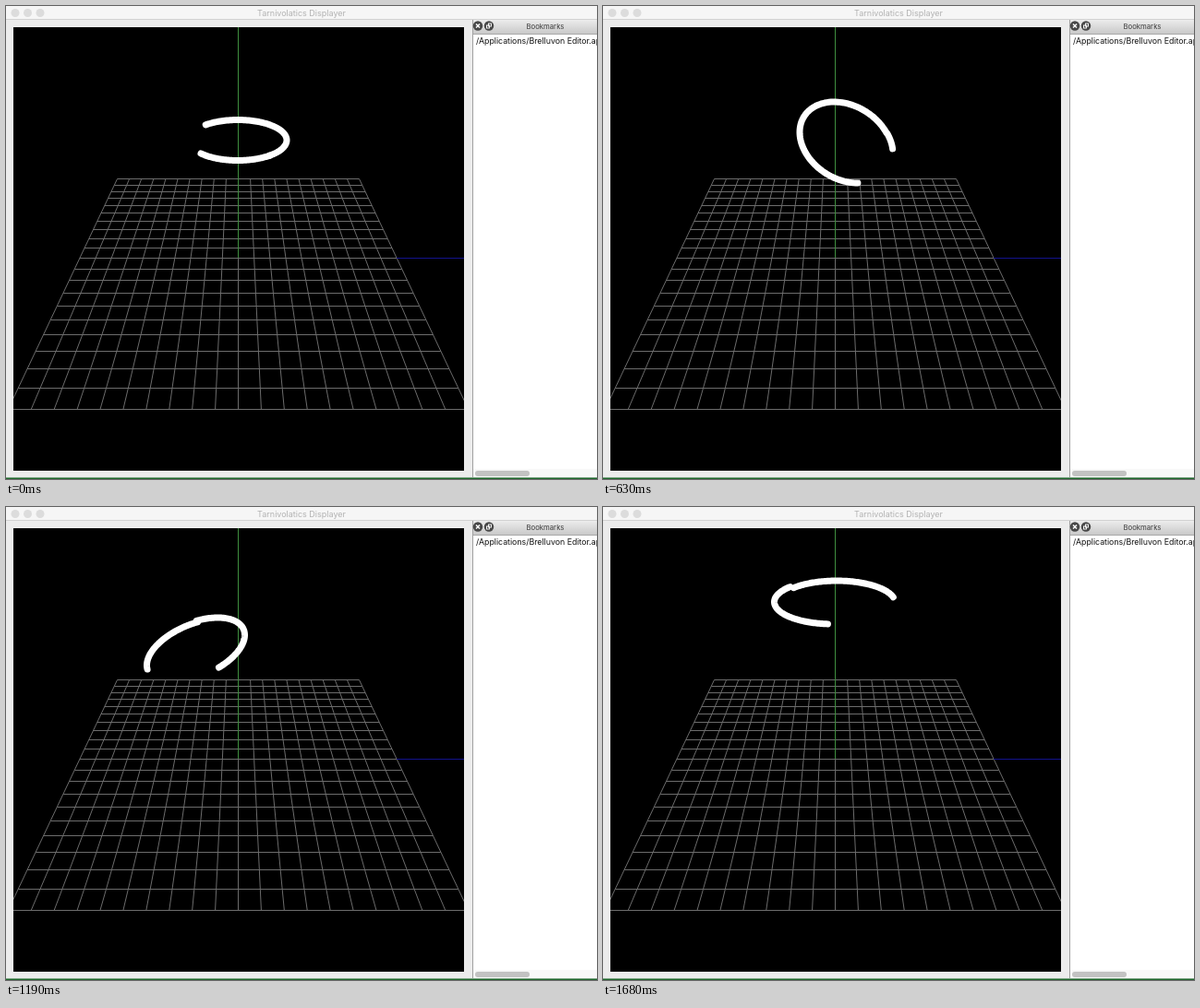
Recreate the animation shown at these times as an HTML page with a canvas. Size 640 by 513 pixels, loop 1750 ms.

```html
<!DOCTYPE html>
<html lang="en">
<head>
<meta charset="utf-8">
<style>
  html, body { margin: 0; width: 100%; height: 100%; overflow: hidden; background: #ececec; }
  canvas { display: block; width: 640px; height: 513px; }
</style>
</head>
<body>
<canvas id="stage" width="640" height="513"></canvas>
<script>
const ctx = document.getElementById("stage").getContext("2d");
const STEP = 70, STEPS = 25, RAD = Math.PI / 180;

// step, centre x/y, radius x/y, skew, head angle, span, seam, drift x/y of the older trail
const poses = [
  [0, 251, 145.5, 53, 22, 0, 229, 270, 180, 0, 0],
  [3, 251, 145.5, 53, 22, 0, 620, 260, 180, 0, 0],
  [5, 251, 145.5, 53, 22, 0, 921, 266, 200, 0, 0],
  [8, 264, 151.5, 49, 52, 15, 1372, 275, 250, 1, 1],
  [9, 263, 148, 50, 44, 14.7, 1515, 278, 256, 1, 1],
  [13, 228, 114, 53.5, 30, 4, 2093, 285, 185, 2, -2],
  [16, 197, 158, 55, 35, -29, 2547, 259, 121, 0, -2],
  [17, 206, 156, 53.5, 34.5, -27, 2691.5, 250, 100, -1, -1.5],
  [21, 289, 147, 57, 21, 6, 3338, 291, 79, -2, 1],
  [24, 249, 103, 63.5, 24, 0, 3695, 250, 128, 4, 1]
];

function poseAt(step) {
  const next = Math.max(1, poses.findIndex(p => p[0] >= step));
  const a = poses[next - 1], b = poses[next];
  const f = (step - a[0]) / (b[0] - a[0]);
  return a.map((v, i) => v + (b[i] - v) * f);
}

function rect(color, x, y, w, h) {
  ctx.fillStyle = color;
  ctx.fillRect(x, y, w, h);
}

function disc(color, x, y, r) {
  ctx.fillStyle = color;
  ctx.beginPath();
  ctx.arc(x, y, r, 0, 7);
  ctx.fill();
}

function line(color, width, ...pts) {
  ctx.strokeStyle = color;
  ctx.lineWidth = width;
  ctx.beginPath();
  for (let i = 0; i < pts.length; i += 2) ctx.lineTo(pts[i], pts[i + 1]);
  ctx.stroke();
}

function text(str, x, y, size, color, align) {
  ctx.font = `${size}px Inter, "Liberation Sans", sans-serif`;
  ctx.textAlign = align;
  ctx.fillStyle = color;
  ctx.fillText(str, x, y);
}

function shade(y0, y1, top, bottom) {
  const g = ctx.createLinearGradient(0, y0, 0, y1);
  g.addColorStop(0, top);
  g.addColorStop(1, bottom);
  return g;
}

function drawWindow() {
  rect("#ececec", 0, 0, 640, 513);
  rect("#f6f6f6", 0, 0, 640, 14);
  rect("#d2d2d2", 0, 14, 640, 1);
  for (const x of [10, 23.5, 37]) disc("#dcdcdc", x, 7.5, 4.5);
  text("Tarnivolatics Displayer", 320, 11, 9, "#b2b2b2", "center");
}

function drawBookmarks() {
  rect(shade(15, 30, "#ececec", "#c9c9c9"), 505, 15, 135, 15);
  rect("#fff", 505, 30, 135, 481);
  rect("#a9a9a9", 505, 30, 135, 1);
  rect("#a0a0a0", 505, 15, 1, 496);
  for (const x of [511, 523]) disc("#484848", x, 21.5, 5.2);
  line("#fff", 1.4, 509, 19.5, 513, 23.5);
  line("#fff", 1.4, 513, 19.5, 509, 23.5);
  ctx.strokeStyle = "#fff";
  ctx.lineWidth = 0.9;
  ctx.strokeRect(522.5, 19, 3, 3);
  ctx.strokeRect(520.5, 21, 3, 3);
  text("Bookmarks", 584, 25, 7.7, "#3c3c3c", "center");
  text("/Applications/Brelluvon Editor.app", 509, 40.5, 8.8, "#111", "left");
  rect("#f8f8f8", 506, 502, 134, 9);
  ctx.fillStyle = "#c2c2c2";
  ctx.beginPath();
  ctx.roundRect(508, 504, 59, 6, 3);
  ctx.fill();
  rect("#1d672b", 0, 511.5, 640, 1.5);
}

function drawFloor() {
  const far = 131, near = 249, top = 187.5;
  const grey = "#6c6c6c";
  for (let i = 0; i <= 20; i++) {
    const half = 1 / (1 / far + (1 / near - 1 / far) * i / 20);
    const y = Math.floor(top + (half - far) * 2.1186) + 0.5;
    line(grey, 1, 251.5 - half, y, 251.5 + half, y);
    const side = i / 10 - 1;
    line(grey, 1, 251.5 + side * far, top, 251.5 + side * near, 437);
  }
  line("#3f8f3f", 1, 251.5, 23, 251.5, 273);
  line("#12128c", 1, 423, 273.5, 496, 273.5);
}

function drawArc(x, y, rx, ry, skew, from, to) {
  const pts = [];
  for (let i = 0; i <= 90; i++) {
    const a = (from + (to - from) * i / 90) * RAD;
    pts.push(x + rx * Math.cos(a), y + ry * Math.sin(a + skew * RAD));
  }
  line("#fff", 7, ...pts);
}

function drawRing(step) {
  const [, x, y, rx, ry, skew, head, span, seam, dx, dy] = poseAt(step);
  ctx.lineCap = ctx.lineJoin = "round";
  drawArc(x, y, rx, ry, skew, head, head + seam);
  drawArc(x + dx, y + dy, rx, ry, skew, head + seam, head + span);
  ctx.lineCap = "butt";
}

function frame(now) {
  drawWindow();
  drawBookmarks();
  ctx.save();
  ctx.beginPath();
  ctx.rect(8, 23, 488, 481);
  ctx.clip();
  rect("#000", 8, 23, 488, 481);
  drawFloor();
  drawRing(Math.floor(now / STEP) % STEPS);
  ctx.restore();
  requestAnimationFrame(frame);
}

const start = performance.now();
requestAnimationFrame(function tick() {
  frame(Math.max(0, performance.now() - start));
});
</script>
</body>
</html>
```
